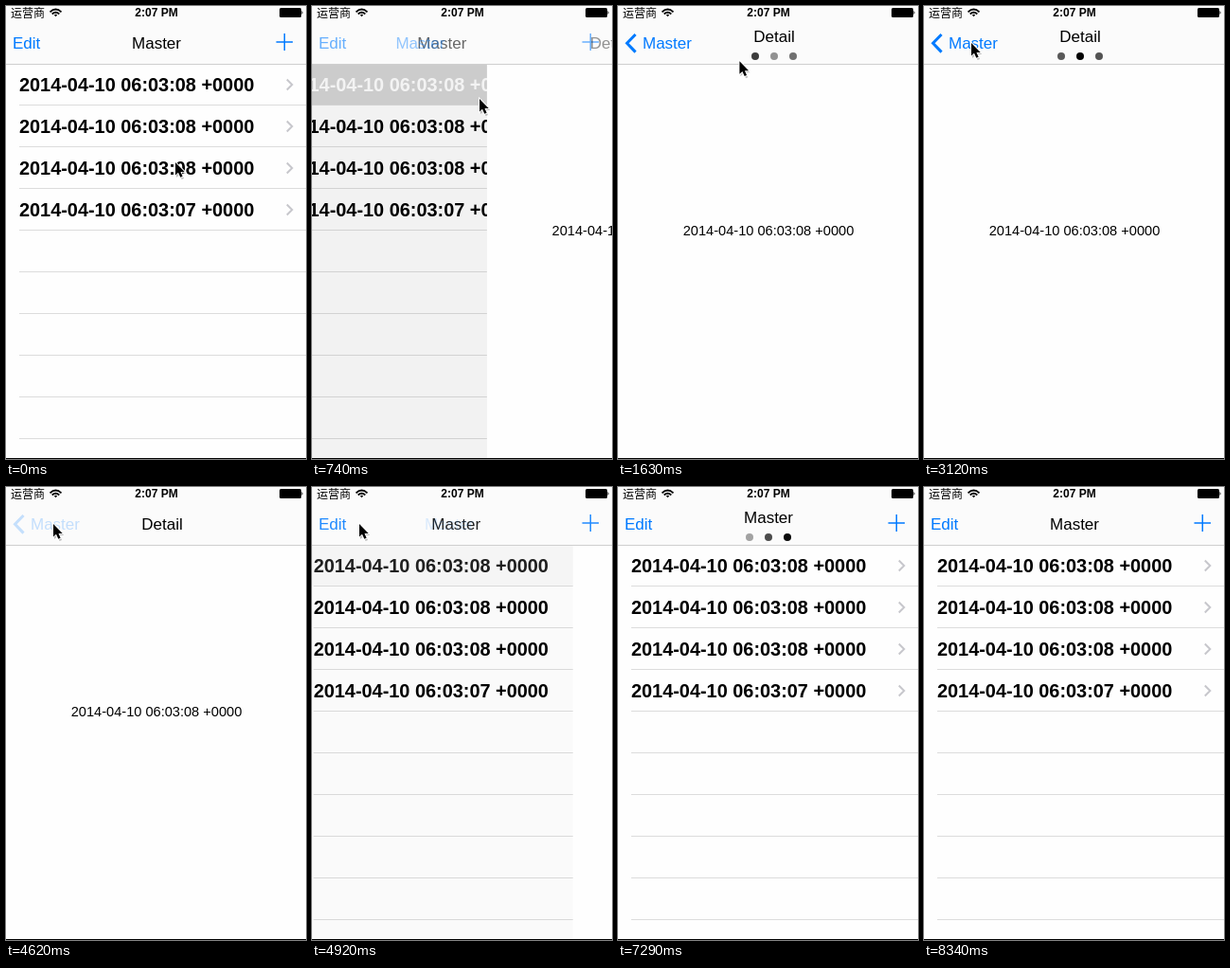
Write an HTML page that moves like this. It is 317x478 px and loops after 8580 ms.

```html
<!DOCTYPE html>
<html lang="en">
<head>
<meta charset="utf-8">
<title>Master and detail</title>
<style>
  html, body { margin: 0; width: 100%; height: 100%; overflow: hidden; background: #fff; }
  svg { display: block; width: 317px; height: 478px; }
  text { font: 17px "Liberation Sans", Arial, sans-serif; white-space: pre; }
  .mid { text-anchor: middle; }
  .row { font-size: 19.9px; font-weight: bold; }
  .label { font-size: 14.6px; }
  .time { font-size: 12px; font-weight: bold; }
  .carrier { font: 12px "Noto Sans CJK SC", "Noto Sans CJK", sans-serif; }
  .blue { fill: #007aff; }
  .line { fill: none; stroke: #007aff; }
</style>
</head>
<body>
<svg viewBox="0 0 317 478">
  <rect width="317" height="478" fill="#fefefe"/>
  <g id="list">
    <rect id="selection" y="61" width="412" height="43" fill="#d6d6d6"/>
  </g>
  <rect id="dim" y="61" width="317" height="416"/>
  <g id="page">
    <rect y="61" width="317" height="416" fill="#fefefe"/>
    <text class="label mid" x="159" y="242">2014-04-10 06:03:08 +0000</text>
  </g>

  <rect width="317" height="61" fill="#fbfbfb"/>
  <rect y="61" width="317" height="1" fill="#cfcfcf"/>
  <g id="actions">
    <text class="blue" x="7" y="45">Edit</text>
    <path class="line" stroke-width="1.5" d="M285.5 38H303M294.3 29V47"/>
  </g>
  <text id="masterTitle" class="mid" y="45">Master</text>
  <text id="detailTitle" class="mid" y="45">Detail</text>
  <path id="chevron" class="line" stroke-width="3" d="M18.5 30L9.5 39.3L18.5 48.6"/>
  <text id="back" class="blue" y="45">Master</text>
  <g id="dots">
    <circle cx="-20" cy="53" r="4"/><circle cy="53" r="4"/><circle cx="20" cy="53" r="4"/>
  </g>

  <text class="carrier" x="5" y="12">运营商</text>
  <g fill="none" stroke="#000" stroke-width="1.8">
    <path d="M46.5 6.3Q52.5 .8 58.5 6.3M48.7 8.5Q52.5 5 56.3 8.5"/>
    <path d="M50.8 9.5Q52.5 8 54.2 9.5L52.5 11.3Z" fill="#000" stroke="none"/>
  </g>
  <text class="time mid" x="159" y="11">2:07 PM</text>
  <rect x="289" y="2" width="23" height="10" rx="1.5"/>
  <path d="M312.5 5Q314.5 7 312.5 9Z"/>
  <rect y="477" width="317" height="1"/>
  <g id="cursor">
    <path d="M1 2v14l3.2-3 2.4 5 2.4-1-2.2-5h4.4z" opacity=".25"/>
    <path d="M0 0v13.5l3-2.8 2.3 5 2.3-1-2.1-4.8h4.2z" stroke="#fff" paint-order="stroke" stroke-width="1.8"/>
  </g>
</svg>
<script>
const LOOP = 8580, STEP = 149, LAST_STEP = 56;
const PUSH = 650, POP = 4680;
const $ = id => document.getElementById(id);
const clamp = v => Math.max(0, Math.min(1, v));
const fade = (id, v) => $(id).setAttribute('opacity', clamp(v));
const move = (id, x, y = 0) => $(id).setAttribute('transform', `translate(${x} ${y})`);

for (let i = 0; i < 9; i++) {
  const y = 61 + 44 * i;
  let row = `<rect x="14" y="${y + 43}" width="398" height="1" fill="#dcdcdc"/>`;
  if (i < 4) row += `<text class="row" x="14" y="${y + 29}">2014-04-10 06:03:0${i < 3 ? 8 : 7} +0000</text>
    <path d="M296.8 ${y + 16.5}l5.5 5.5l-5.5 5.5" fill="none" stroke="#c7c7cc" stroke-width="2"/>`;
  $('list').insertAdjacentHTML('beforeend', row);
}
const firstRow = document.querySelector('.row');
const dots = [...$('dots').children];

// Critically damped spring from 0 to 1
function spring(ms) {
  const k = Math.max(0, ms) * 0.015;
  return 1 - (1 + k) * Math.exp(-k);
}

// Title lift while loading: rises at start and drops back before end
const lift = (t, start, end) => clamp(Math.min((t - start) / 200, (end - t) / 200));

const cursorPath = [
  [0, 179, 165], [450, 177, 98], [900, 177, 98], [1190, 177, 69], [1340, 176, 68],
  [2080, 43, 41], [2235, 52, 42], [2384, 50, 39], [5780, 50, 39], [6600, 294, 480]
];
function cursorAt(t) {
  const i = cursorPath.findIndex(p => p[0] > t);
  if (i < 0) return [294, 500];
  const [a, b] = [cursorPath[i - 1], cursorPath[i]];
  const u = (t - a[0]) / (b[0] - a[0]), s = u * u * (3 - 2 * u);
  return [a[1] + (b[1] - a[1]) * s, a[2] + (b[2] - a[2]) * s];
}

function draw(t) {
  const popping = t > POP;
  let p = popping ? 1 - spring(t - POP) : spring(t - PUSH);
  if (p > 0.995) p = 1;
  if (p < 0.005) p = 0;

  move('list', -95 * p);
  const selected = popping ? p : +(t > 520);
  fade('selection', selected);
  const tone = Math.round(255 * selected);
  firstRow.setAttribute('fill', `rgb(${tone},${tone},${tone})`);
  fade('dim', p * 0.11);
  move('page', 317 * (1 - p));

  const onDetail = t < POP;
  const start = onDetail ? 1300 : 5250;
  const up = lift(t, start, onDetail ? 4450 : 8300);
  move('masterTitle', 159 - 52 * p, onDetail ? 0 : -7 * up);
  move('detailTitle', 165 + 258 * (1 - p), onDetail ? -7 * up : 0);
  fade('masterTitle', 1 - p);
  fade('detailTitle', p);
  fade('actions', 1 - p);

  const pressed = t > 4600 && t <= POP ? 0.22 : 1;
  fade('chevron', p ** 12 * pressed);
  fade('back', p * pressed);
  move('back', 26 + 107 * (1 - p));

  // Triangle wave running through the dots, a quarter period apart
  move('dots', onDetail ? 165 : 159);
  fade('dots', up);
  const phase = (t - start) / 520 + 1;
  dots.forEach((dot, i) => {
    const u = Math.max(0, phase - i / 2) % 2;
    const grey = Math.round(172 * (1 - Math.abs(u - 1)));
    dot.setAttribute('fill', `rgb(${grey},${grey},${grey})`);
  });

  move('cursor', ...cursorAt(t));
}

function tick(now) {
  const step = Math.min(LAST_STEP, Math.floor((now % LOOP + 15) / 148.9));
  draw(step * STEP);
  requestAnimationFrame(tick);
}
tick(performance.now());
</script>
</body>
</html>
```
